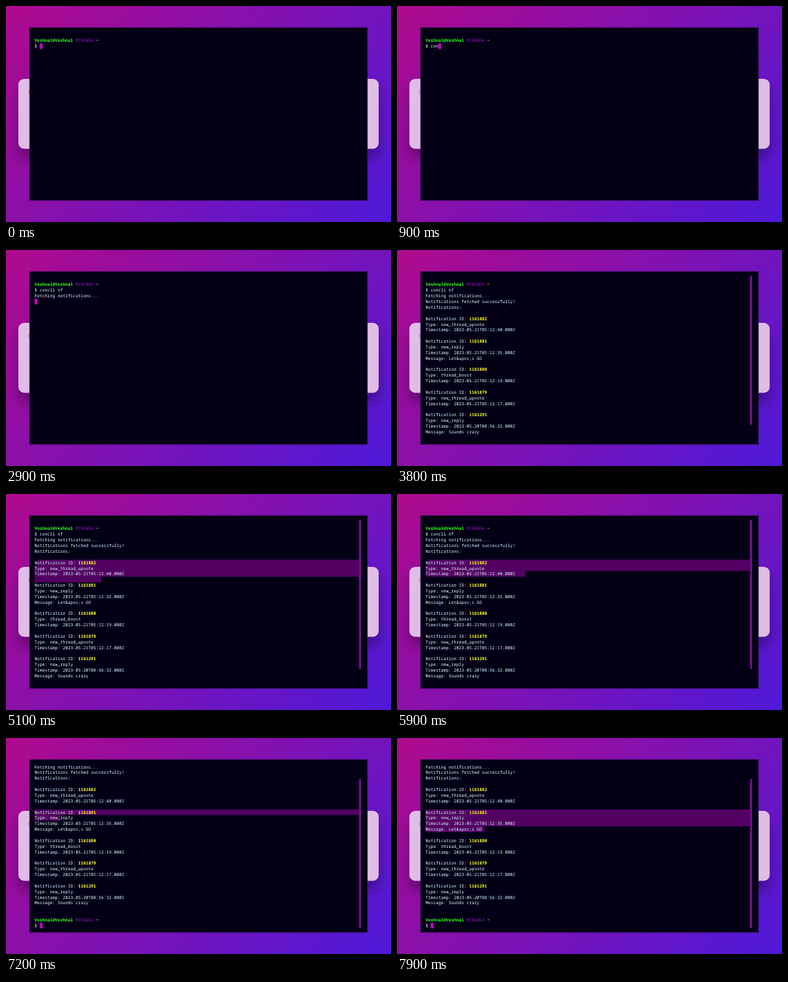
Write an HTML page that moves like this. It is 600 by 338 pixels and loops after 8 s.

```html
<!DOCTYPE html>
<html lang="en">
<head>
<meta charset="utf-8">
<title>Terminal notifications</title>
<style>
  html, body { margin: 0; width: 100%; height: 100%; overflow: hidden; }
  svg { display: block; width: 100vw; height: 100vh; }
  text {
    font: 500 6.667px "Noto Sans Mono", "DejaVu Sans Mono", monospace;
    white-space: pre;
    text-rendering: geometricPrecision;
  }
  .bold { font-weight: 700; }
</style>
</head>
<body>
<svg id="stage" viewBox="0 0 600 338" preserveAspectRatio="none">
  <defs>
    <!-- 135 degree gradient whose ends meet the stage corners -->
    <linearGradient id="backdrop" gradientUnits="userSpaceOnUse" x1="65.5" y1="-65.5" x2="534.5" y2="403.5">
      <stop offset="0" stop-color="#af0a8d"/>
      <stop offset="1" stop-color="#4e19d9"/>
    </linearGradient>
    <filter id="soft" x="-10%" y="-50%" width="120%" height="200%">
      <feGaussianBlur stdDeviation="10"/>
    </filter>
    <clipPath id="screen"><rect x="37" y="38" width="526" height="264"/></clipPath>
  </defs>
  <rect width="600" height="338" fill="url(#backdrop)"/>
  <rect x="19.5" y="128" width="561" height="110" rx="9" fill="#000" opacity=".32" filter="url(#soft)"/>
  <rect x="19.3" y="114" width="561.5" height="109.5" rx="9" fill="#e0bde6"/>
  <circle cx="39.5" cy="134.5" r="5" fill="#c48fc0"/>
  <rect x="36.9" y="33.9" width="526.2" height="270.2" fill="#030016" stroke="#261040" stroke-width=".8"/>
  <g clip-path="url(#screen)">
    <g id="content">
      <path id="selection" fill="#520062"/>
      <rect id="cursor" width="4.3" height="8.8" fill="#c404c0"/>
      <g id="lines"></g>
    </g>
  </g>
  <rect id="scrollbar" x="550.3" width="3" height="233.5" rx=".8" fill="#7a1490"/>
</svg>
<script>
const LOOP = 8000;
const LEFT = 44.5, RIGHT = 550, CHAR = 4, ROW = 8.873, TOP = 49.6;
const COMMAND = "concli nf";
const KEY_TIMES = [300, 600, 800, 1000, 1200, 1500, 1900, 2100, 2300];
const ENTER = 2600, RESULTS = 3000, SCROLL_UP = 3700, SCROLL_DOWN = 6100;

// Drags: start cell, then [time, row, column] of the pointer
const DRAGS = [
  { from: 4500, to: 6800, row: 6, col: 1,
    path: [[4500, 6, 1], [5100, 9, 26], [5300, 9, 26], [5500, 8, 39]] },
  { from: 6900, to: LOOP, row: 10, col: 0,
    path: [[6900, 10, 0], [7600, 13, 23]] }
];

const WHITE = "#e2ffff";
const PROMPT = [
  ["Veshnal@Veshnal ", "#3cff1e", true],
  ["MINGW64 ", "#9412b4", false],
  ["~", "#f0f060", true]
];
const plain = text => [[text, WHITE]];
const notice = (id, type, stamp, message) => [
  [],
  [["Notification ID: ", WHITE], [id, "#ffff20", true]],
  plain("Type: " + type),
  plain("Timestamp: 2023-05-" + stamp + ".000Z"),
  ...(message ? [plain("Message: " + message)] : [])
];
const ROWS = [
  PROMPT,
  plain("$ "),
  plain("Fetching notifications..."),
  plain("Notifications fetched successfully!"),
  plain("Notifications:"),
  ...notice("1161882", "new_thread_upvote", "21T05:12:40"),
  ...notice("1161881", "new_reply", "21T05:12:35", "Let&apos;s GO"),
  ...notice("1161880", "thread_boost", "21T05:12:19"),
  ...notice("1161879", "new_thread_upvote", "21T05:12:17"),
  ...notice("1161291", "new_reply", "20T08:56:32", "Sounds crazy"),
  [], [],
  PROMPT,
  plain("$ ")
];

const byId = id => document.getElementById(id);
const [content, selection, cursor, lines, scrollbar] =
  ["content", "selection", "cursor", "lines", "scrollbar"].map(byId);
const rowY = row => TOP + row * ROW;
const colX = col => LEFT + col * CHAR;

function make(tag, parent, attrs) {
  const node = document.createElementNS("http://www.w3.org/2000/svg", tag);
  for (const key in attrs) node.setAttribute(key, attrs[key]);
  return parent.appendChild(node);
}

const rowNodes = ROWS.map((parts, row) => {
  const text = make("text", lines, { x: LEFT, y: rowY(row) + 6.8 });
  for (const [string, fill, bold] of parts) {
    make("tspan", text, { fill, class: bold ? "bold" : "" }).textContent = string;
  }
  return text;
});

function pointerAt(path, t) {
  const next = path.findIndex(point => point[0] > t);
  if (next < 0) return path[path.length - 1].slice(1);
  const a = path[next - 1], b = path[next];
  const k = (t - a[0]) / (b[0] - a[0]);
  return [1, 2].map(i => Math.round(a[i] + (b[i] - a[i]) * k));
}

function selectionPath(t) {
  const drag = DRAGS.find(d => t >= d.from && t < d.to);
  if (!drag) return "";
  const [endRow, endCol] = pointerAt(drag.path, t);
  let d = "";
  for (let row = drag.row; row <= endRow; row++) {
    const x = row === drag.row ? colX(drag.col) : LEFT;
    const right = row === endRow ? colX(endCol) : RIGHT;
    d += `M${x} ${rowY(row)}H${right}v${ROW}H${x}z`;
  }
  return d;
}

function render(t) {
  const typed = KEY_TIMES.filter(time => time <= t).length;
  const done = t >= RESULTS;
  const scroll = done && (t < SCROLL_UP || t >= SCROLL_DOWN) ? 3 : 0;
  const shown = done ? ROWS.length : t >= ENTER ? 3 : 2;

  rowNodes.forEach((node, row) => {
    const visible = row < shown && row >= scroll - 1 && row < scroll + 28;
    node.style.display = visible ? "" : "none";
  });
  rowNodes[1].firstChild.textContent = "$ " + COMMAND.slice(0, typed);

  const [row, col] = done ? [30, 2] : t >= ENTER ? [3, 0] : [1, 2 + typed];
  cursor.setAttribute("x", colX(col));
  cursor.setAttribute("y", rowY(row));
  selection.setAttribute("d", selectionPath(t));
  content.setAttribute("transform", `translate(0 ${-scroll * ROW})`);
  scrollbar.setAttribute("y", scroll ? 64.3 : 40.2);
  scrollbar.style.display = done ? "" : "none";
}

const start = performance.now();
function frame() {
  render((performance.now() - start) % LOOP);
  requestAnimationFrame(frame);
}
frame();
</script>
</body>
</html>
```
